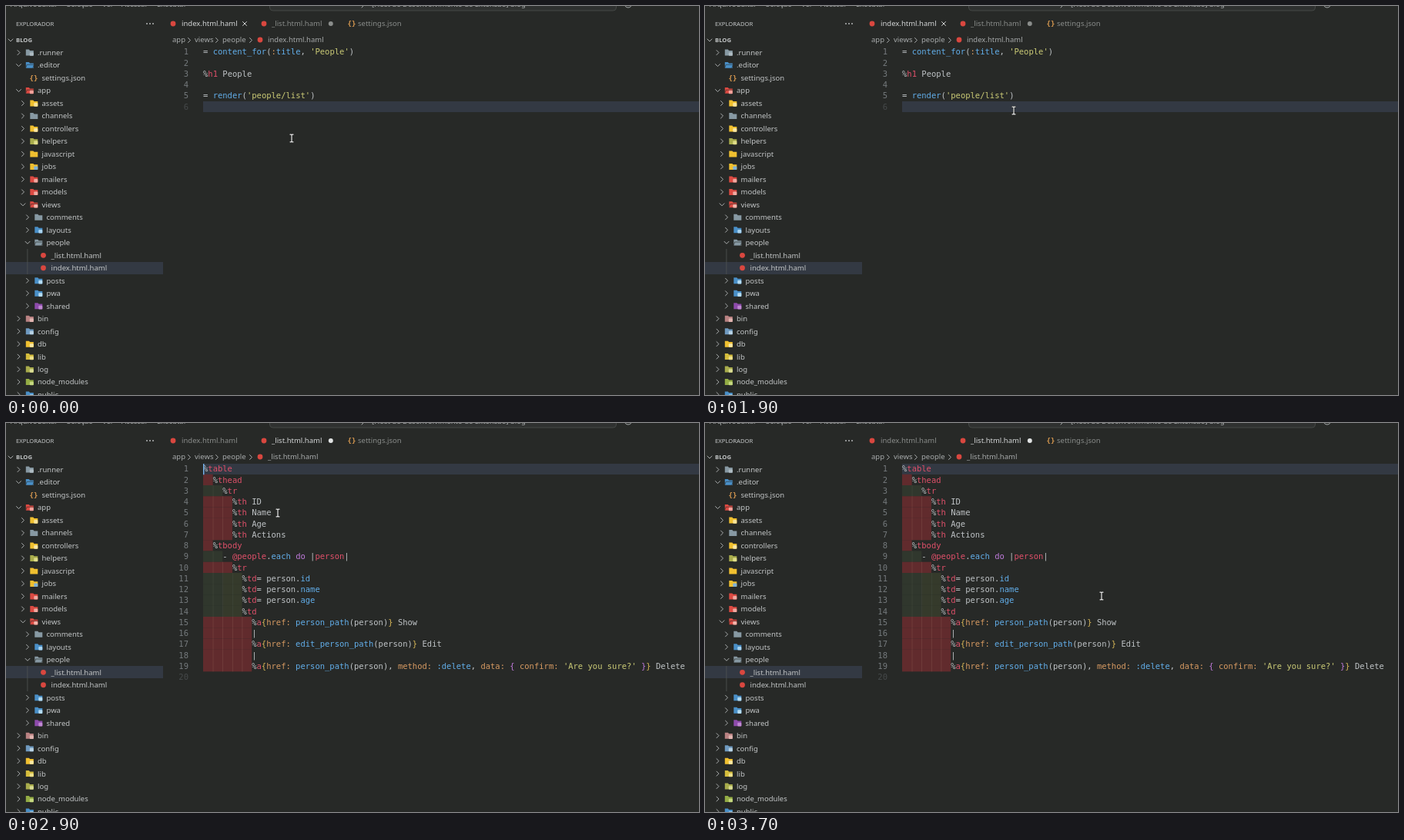
Recreate the animation shown at these times as an HTML page. Size 900 by 506 pixels, loop 3.8 s.

```html
<!DOCTYPE html>
<html lang="pt">
<head>
<meta charset="utf-8">
<title>Editor</title>
<style>
html, body { margin: 0; width: 100%; height: 100%; overflow: hidden; background: #272927; }
svg { display: block; width: 900px; height: 506px; }
text { white-space: pre; font: 9.5px "Noto Sans", "Open Sans", sans-serif; fill: #c3c6c7; }
.code text { font: 10.5px "DejaVu Sans Mono", monospace; }
.link { text-decoration: underline; }
</style>
</head>
<body>
<svg id="stage" viewBox="0 0 900 506"></svg>
<script>
const NS = "http://www.w3.org/2000/svg";
const stage = document.getElementById("stage");
const LOOP = 3800, STEP = 100;
const LINE = 14.25, TOP = 59.6, LEFT = 256, CHAR = 6.32;
const ROW = 16.48, ROW_TOP = 60.6;
const RED = "#d9473f", DIM = "#8a8d8b", BRIGHT = "#d5d7d8", SELECT = "#333943";

function add(parent, tag, attrs, content) {
  const el = document.createElementNS(NS, tag);
  for (const name in attrs) el.setAttribute(name, attrs[name]);
  if (content !== undefined) el.textContent = content;
  parent.appendChild(el);
  return el;
}
const group = (parent, attrs) => add(parent, "g", attrs);
const rect = (p, x, y, width, height, fill, rx = 0) => add(p, "rect", { x, y, width, height, fill, rx });
const path = (p, d, stroke, fill = "none", w = 1) =>
  add(p, "path", { d, stroke, fill, "stroke-width": w, "stroke-linecap": "round", "stroke-linejoin": "round" });
const dot = (p, cx, cy, r, fill) => add(p, "circle", { cx, cy, r, fill });
const label = (p, x, cy, s, style = "") => add(p, "text", { x, y: cy + 3.4, style }, s);
const show = (el, on) => el.setAttribute("visibility", on ? "inherit" : "hidden");
const lineY = n => TOP + (n - 1) * LINE;

function chevron(p, x, y, open) {
  path(p, open ? `M${x - 3} ${y - 1.5}l3 3l3 -3` : `M${x - 1.5} ${y - 3}l3 3l-3 3`, "#a9acad");
}

function folder(p, x, y, color, open, badge) {
  path(p, `M${x - 5} ${y - 4}h4l1.3 1.4h4.7v6.6h-10z`, "none", color);
  if (open) path(p, `M${x - 3.2} ${y - 0.8}h8.8l-1.6 4.8h-9z`, "#272927", color, 0.6);
  if (badge) rect(p, x, y - 0.4, 5, 4.6, badge, 1);
}

function braces(p, x, y) {
  add(p, "text", { x: x - 5.5, y: y + 3.2, style: "font:bold 9px 'DejaVu Sans Mono',monospace;fill:#d99a50" }, "{}");
}

// Window chrome
[["Arquivo", 6], ["Editar", 41], ["Seleção", 79], ["Ver", 125], ["Acessar", 150], ["Executar", 196]]
  .forEach(([s, x]) => label(stage, x, -2, s, "fill:#a9acad"));
add(stage, "rect", { x: 342.5, y: -12, width: 450, height: 18, rx: 4, fill: "#2f3130", stroke: "#454846" });
label(stage, 475, -2.4, "[Host de Desenvolvimento de Extensão] blog", "fill:#a9acad");
path(stage, "M465 -1l-3 3", "#a9acad");
add(stage, "circle", { cx: 808, cy: -3, r: 5, fill: "none", stroke: "#a9acad" });

// Explorer
const selection = rect(stage, 0, 0, 204, 16, SELECT);
label(stage, 13, 23, "EXPLORADOR", "font-size:7.7px");
[183, 187, 191].forEach(x => dot(stage, x, 23, 0.9, "#c0c2c3"));
chevron(stage, 6, 44.5, true);
label(stage, 13, 44, "BLOG", "font-size:7.7px;font-weight:700");
rect(stage, 27.5, 316, 0.8, 33, "#515553");

const GREY = "#8799a3", BLUE = "#4a90c8", GOLD = "#f0c030", OLIVE = "#a9ad4c";
// name, level, kind (> closed, v open, j json, h template), colour, badge
const TREE = [
  [".runner", 0, ">", GREY, "#aebbc2"], [".editor", 0, "v", BLUE], ["settings.json", 1, "j"],
  ["app", 0, "v", "#dc4a42", "#f2a19a"],
  ["assets", 1, ">", GOLD, "#fae49a"], ["channels", 1, ">", GREY], ["controllers", 1, ">", GOLD, "#fbe8a6"],
  ["helpers", 1, ">", OLIVE, "#e0dd8a"], ["javascript", 1, ">", GOLD], ["jobs", 1, ">", GOLD, "#7fb2d8"],
  ["mailers", 1, ">", "#dc4a42", "#f0aaa2"], ["models", 1, ">", "#dc4a42", "#f0aaa2"], ["views", 1, "v", "#dc4a42", "#f6b3aa"],
  ["comments", 2, ">", GREY], ["layouts", 2, ">", BLUE, "#a9d4f0"], ["people", 2, "v", GREY],
  ["_list.html.haml", 3, "h"], ["index.html.haml", 3, "h"],
  ["posts", 2, ">", BLUE, "#b5dcf2"], ["pwa", 2, ">", BLUE, "#b5dcf2"], ["shared", 2, ">", "#8e4bac", "#c08ad2"],
  ["bin", 0, ">", "#b98282", "#e0b5b0"], ["config", 0, ">", "#6f9ac0", "#b8d2e4"], ["db", 0, ">", GOLD, "#fbe8a6"],
  ["lib", 0, ">", "#d5bd3c", "#eee08c"], ["log", 0, ">", OLIVE, "#d9dc94"], ["node_modules", 0, ">", "#94ad45", "#c6d880"],
  ["public", 0, ">", BLUE, "#b5dcf2"]
];
TREE.forEach(([name, level, kind, color, badge], i) => {
  const y = ROW_TOP + i * ROW, x = level === 0 ? 41 : 40.5 + level * 6;
  if (kind === "j") braces(stage, x - 10.5, y);
  else if (kind === "h") dot(stage, x - 10, y, 3.4, RED);
  else {
    chevron(stage, x - 24.5, y, kind === "v");
    folder(stage, x - 10.2, y, color, kind === "v", badge);
  }
  label(stage, x, y, name);
});

// Tabs and breadcrumb
const tabs = ["index.html.haml", "_list.html.haml"].map((name, i) => {
  dot(stage, i ? 335 : 217, 23, 3.4, RED);
  return label(stage, i ? 345 : 228, 23, name);
});
const closeMark = path(stage, "M307.5 20.5l5 5m0 -5l-5 5", "#d0d2d3");
const dirty = dot(stage, 421.8, 23, 3, DIM);
braces(stage, 449, 23);
label(stage, 457, 23, "settings.json", `fill:${DIM}`);
[["app", 216, 238], ["views", 245, 274], ["people", 281, 318]].forEach(([s, x, c]) => {
  label(stage, x, 44, s, "fill:#a8abac");
  chevron(stage, c, 44.5, false);
});
dot(stage, 330, 44, 3.4, RED);
const crumb = label(stage, 340, 44, "", "fill:#a8abac");

// Code: "~" plus a colour key starts each token
const INK = { w: "#bfc3c6", r: "#e0506a", b: "#62aeea", s: "#cbcb76", o: "#d79a62", p: "#c07bdc", g: "#d9b857", L: "#cbcb76" };
const INDEX = [
  "~w= ~bcontent_for~w(~o:~btitle~w, ~s'People'~w)", "", "~w%~rh1~w People", "",
  "~w= ~brender~w(~s'~Lpeople/list~s'~w)", ""
];
const href = (fn, rest) => `          ~w%~ra~g{~ohref: ~b${fn}~w(person)${rest}`;
const LIST = [
  "~w%~rtable", "  ~w%~rthead", "    ~w%~rtr",
  ...["ID", "Name", "Age", "Actions"].map(s => `      ~w%~rth~w ${s}`),
  "  ~w%~rtbody", "    ~w- ~r@people~w.~beach ~pdo ~w|~rperson~w|", "      ~w%~rtr",
  ...["id", "name", "age"].map(s => `        ~w%~rtd~w= person.~b${s}`),
  "        ~w%~rtd",
  href("person_path", "~g}~w Show"), "          ~w|",
  href("edit_person_path", "~g}~w Edit"), "          ~w|",
  href("person_path", ", ~omethod: ~b:delete~w, ~odata: ~p{ ~oconfirm: ~s'Are you sure?' ~p}~g}~w Delete"), ""
];

const bar = rect(stage, LEFT, 0, 644, 14, SELECT);

function indentBlocks(g, indent, top) {
  const odd = indent % 4;
  if (odd) rect(g, LEFT, top, indent * CHAR, LINE + 0.1, "#612b2d");
  else for (let c = 0; c < indent; c += 4)
    rect(g, LEFT + c * CHAR, top, 4 * CHAR, LINE + 0.1, c ? "#353a2b" : "#30372d");
  for (let c = 2; c < indent; c += 2)
    rect(g, LEFT + c * CHAR, top, 0.75, LINE + 0.1, odd ? "#74423f" : "#3f4539");
}

function editor(lines) {
  const g = group(stage, { class: "code" });
  lines.forEach((src, i) => {
    const y = lineY(i + 1), last = i === lines.length - 1;
    add(g, "text", { x: 237, y: y + 3.7, "text-anchor": "end", style: `fill:${last ? "#464a4b" : "#757a7d"}` }, i + 1);
    const indent = src.search(/\S|$/);
    indentBlocks(g, indent, y - LINE / 2);
    const text = add(g, "text", { x: LEFT + indent * CHAR, y: y + 3.7 });
    src.trimStart().split("~").slice(1).forEach(t =>
      add(text, "tspan", { style: `fill:${INK[t[0]]}`, "data-key": t[0] }, t.slice(1)));
  });
  return g;
}
const indexView = editor(INDEX), listView = editor(LIST);
const link = indexView.querySelector("[data-key=L]");
const caret = rect(stage, 0, 0, 1.4, LINE, "#76b5ef");

// Pointers
const beam = group(stage, {});
const beamShape = "M-2 -4.8h1.3l.7 .6l.7 -.6h1.3M0 -4.2v8.4M-2 4.8h1.3l.7 -.6l.7 .6h1.3";
path(beam, beamShape, "#202220", "none", 2.4);
path(beam, beamShape, "#ececec", "none", 1.2);
const hand = group(stage, {});
path(hand, "M-2.8 -4.8q1.3 -.8 1.7 .6v2.7l4 .6q1.3 .3 1.2 1.6l-.7 4h-5l-2.5 -3.2q-.6 -1.4 .8 -1.4l.7 .5z", "#e4e6e6", "#2b2d2c", 1.1);

const MOVES = [
  [0, 371, 172], [100, 371, 172], [600, 348, 120], [900, 348, 120], [1200, 354, 121], [1400, 355, 122],
  [1800, 400, 136], [1900, 401, 136], [2100, 412, 133], [2200, 412, 133], [2600, 353, 117],
  [2900, 353, 117], [3000, 354, 117], [3500, 515, 225], [3800, 515, 225]
];
function pointerAt(t) {
  const i = MOVES.findIndex(m => m[0] > t);
  const [t0, x0, y0] = MOVES[i - 1], [t1, x1, y1] = MOVES[i];
  const k = (t - t0) / (t1 - t0), e = k * k * (3 - 2 * k);
  return [x0 + (x1 - x0) * e, y0 + (y1 - y0) * e];
}
const within = (t, a, b) => t >= a && t < b;

function draw(now) {
  const t = Math.floor((now % LOOP) / STEP) * STEP;
  const list = t >= 2900, clicked = within(t, 2800, 2900);
  const linked = within(t, 600, 1400) || within(t, 2600, 2900);

  show(indexView, !list);
  show(listView, list);
  show(closeMark, !list);
  tabs.forEach((tab, i) => { tab.style.fill = (i === 1) === list ? BRIGHT : DIM; });
  dirty.setAttribute("fill", list ? "#e2e4e4" : DIM);
  crumb.textContent = list ? "_list.html.haml" : "index.html.haml";
  selection.setAttribute("y", Math.round(ROW_TOP + (list ? 16 : 17) * ROW - 8));

  const current = list ? 1 : clicked ? 5 : 6, barY = Math.round(lineY(current) - 7);
  bar.setAttribute("y", barY);
  show(caret, clicked || within(t, 2900, 3400));
  caret.setAttribute("x", list ? LEFT : LEFT + 15 * CHAR);
  caret.setAttribute("y", barY);
  link.style.fill = linked ? INK.b : INK.L;
  link.setAttribute("class", linked ? "link" : "");

  const at = `translate(${pointerAt(t).join(" ")})`, pointing = linked && !clicked;
  beam.setAttribute("transform", at);
  hand.setAttribute("transform", at);
  show(beam, !pointing);
  show(hand, pointing);
}

const start = performance.now();
function tick() {
  draw(performance.now() - start);
  requestAnimationFrame(tick);
}
tick();
</script>
</body>
</html>
```
